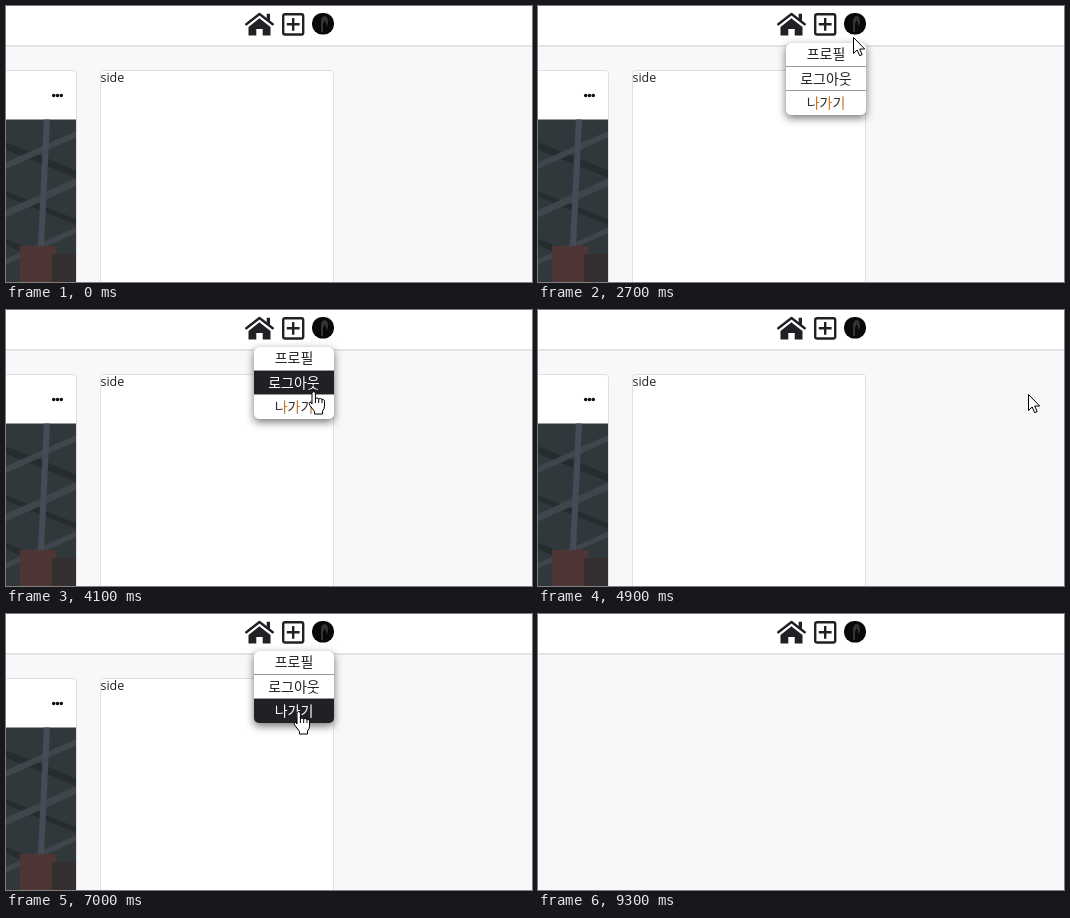
Write an HTML page that moves like this. It is 526 px wide and 276 px high and loops after 9.9 s.

```html
<!DOCTYPE html>
<html lang="ko">
<head>
<meta charset="utf-8">
<style>
  html, body { margin: 0; width: 100%; height: 100%; overflow: hidden; background: #f8f8fb; }
  svg { display: block; }
  text { font: 300 14px "Noto Sans CJK KR", "Noto Sans CJK", sans-serif; text-anchor: middle; fill: #222; }
  .latin { font: 12.5px "Open Sans", "Noto Sans", sans-serif; text-anchor: start; }
  .card { fill: #fff; stroke: #dfdfe3; }
  .ink { fill: none; stroke: #202124; stroke-width: 2.4; }
  #menu { filter: drop-shadow(0 3px 4px rgba(0, 0, 0, .55)); }
  #arrow, #hand { fill: #fff; stroke: #000; stroke-linejoin: round; }
</style>
</head>
<body>
<svg width="526" height="276" viewBox="0 0 526 276">
  <defs>
    <linearGradient id="fringe" gradientUnits="userSpaceOnUse" x1="268.700" x2="281.600" spreadMethod="repeat">
      <stop offset=".55" stop-color="#2c2a2c"/><stop offset=".65" stop-color="#c8701c"/>
    </linearGradient>
    <clipPath id="frame"><path d="M0 113.500H70V276H0z"/></clipPath>
    <clipPath id="menuShape"><rect x="248" y="37" width="80" height="72" rx="5"/></clipPath>
  </defs>

  <path fill="#fff" d="M0 0H526V39H0z"/>
  <path fill="#dedee1" d="M0 39.300H526V40.700H0z"/>
  <path fill="#202124" d="M242.500 21L253.500 12.300 264.500 21V29.500H256.700V23H250.300V29.500H242.500zM260.700 7.700H264V16L260.700 13z"/>
  <path class="ink" d="M240.300 18.300L253.500 8 266.700 18.300" stroke-linecap="round" stroke-linejoin="round"/>
  <rect class="ink" x="277.200" y="8.200" width="20" height="20.300" rx="1.800"/>
  <path class="ink" d="M287.200 12V24.700M280.800 18.300H293.600"/>
  <rect x="306" y="7" width="22" height="21.500" rx="10" fill="#080909"/>
  <path d="M315 26V14q1-4 4-4t3 6l-1 5-2-7-2 4v8z" fill="#333"/>

  <g id="page">
    <rect class="card" x="-9.500" y="64.500" width="80" height="230" rx="3"/>
    <path d="M47.700 89.500h8" stroke="#111" stroke-width="3.600" stroke-linecap="round" stroke-dasharray="0 3.800"/>
    <g clip-path="url(#frame)">
      <path fill="#31383c" d="M0 113H70V276H0z"/>
      <g id="beams"></g>
      <path stroke="#434d59" stroke-width="6" d="M41 113L35 240"/>
      <path fill="#4d3634" d="M14 240H50V276H14z"/>
      <path fill="#362f30" d="M46 248H70V276H46z"/>
    </g>
    <rect class="card" x="94.500" y="64.500" width="233" height="230" rx="3"/>
    <text class="latin" x="94.500" y="76">side</text>
  </g>

  <g id="menu">
    <g clip-path="url(#menuShape)">
      <path fill="#999" d="M248 37H328V109H248z"/>
      <g class="item"><path d="M248 37h80v23h-80z"/><text x="288" y="53">프로필</text></g>
      <g class="item"><path d="M248 61h80v23h-80z"/><text x="288" y="77.500">로그아웃</text></g>
      <g class="item"><path d="M248 85h80v24h-80z"/><text x="288" y="102" fill="url(#fringe)" style="fill:url(#fringe)">나가기</text></g>
    </g>
  </g>

  <path id="arrow" d="M.5.500V16.500L4.200 13 6.700 18.700 9.200 17.600 6.700 12H11.700z"/>
  <path id="hand" d="M-3 13V2.500q0-2 1.700-2t1.700 2V8q0-1 1.600-1t1.700 1.500q0-1 1.600-1t1.700 1.500q0-1 1.300-.6t1.200 2V15q0 3-2 5v3H-.500V20.500L-5 14.500q-1.500-2-.5-3t2.500 1.500zM.400 8v4M3.700 8.500v3.500M7 9v3"/>
</svg>
<script>
const LOOP = 9900, STEP = 100, FADE_STEPS = 3;
const $ = id => document.getElementById(id);
const items = [...document.querySelectorAll('.item')].map(g => g.children);
const baseFill = items.map(([, label]) => label.style.fill);

// Roof beams behind the pole
$('beams').innerHTML = Array.from({ length: 6 }, (_, i) =>
  `<path d="M-5 ${138 + i * 24}l80 ${i % 2 ? -36 : 32}" stroke="${i % 2 ? '#3f474c' : '#262c30'}" stroke-width="${7 - i % 3}"/>`
).join('');

const avatar = [316, 18], below = [315, 31], profile = [314, 44], logout = [309, 81],
      leave = [294, 97], rest = [490, 84], lower = [325, 115];

// Where the pointer is at each time; null means off stage
const route = [
  [0, null], [200, [300, 250]], [300, [308, 84]], [400, null],
  [1400, [402, 150]], [1900, avatar], [2400, avatar], [2700, below], [3200, leave],
  [3600, profile], [4000, logout], [4300, logout], [4400, leave], [4600, [509, 90]],
  [4700, rest], [5000, rest], [5600, avatar], [6100, avatar], [6300, [293, 80]],
  [6600, leave], [7000, leave], [7400, avatar], [7700, profile], [8400, profile],
  [8600, lower], [9000, lower], [9200, [500, 63]], [9300, null], [LOOP, null]
];
const menuOpen = t => t >= 2400 && t < 4900 || t >= 5900 && t < 8200;

function pointerAt(t) {
  const next = route.findIndex(([time]) => time > t);
  const [t0, from] = route[next - 1], [t1, to] = route[next];
  const k = (t - t0) / (t1 - t0);
  return from && from.map((v, i) => Math.round(v + ((to || from)[i] - v) * k));
}

function itemAt(t, p) {
  const inside = p && menuOpen(t) && p[0] >= 248 && p[0] < 328 && p[1] >= 37 && p[1] < 109;
  return inside ? Math.floor((p[1] - 37) / 24) : -1;
}

function hoverAt(t) {
  const shade = [0, 0, 0];
  for (let s = 0; s <= t; s += STEP) {
    const hit = itemAt(s, pointerAt(s));
    shade.forEach((v, i) => shade[i] = Math.min(FADE_STEPS, Math.max(0, v + (i === hit ? 1 : -1))));
  }
  return shade.map(v => v / FADE_STEPS);
}

const mix = (a, b, k) => `rgb(${a.map((v, i) => Math.round(v + (b[i] - v) * k))})`;
const show = (el, on) => el.style.display = on ? '' : 'none';

function draw(t) {
  const p = pointerAt(t);
  const onAvatar = p && Math.hypot(p[0] - 317, p[1] - 18) < 11;
  const hand = onAvatar || itemAt(t, p) >= 0;
  show($('page'), t < 8200);
  show($('menu'), menuOpen(t));
  show($('arrow'), p && !hand);
  show($('hand'), p && hand);
  if (p) $(hand ? 'hand' : 'arrow').setAttribute('transform', `translate(${p})`);
  hoverAt(t).forEach((k, i) => {
    const [box, label] = items[i];
    box.style.fill = mix([255, 255, 255], [32, 33, 36], k);
    label.style.fill = k ? mix([34, 34, 34], [255, 255, 255], k) : baseFill[i];
  });
}

const start = performance.now();
function tick() {
  const t = (performance.now() - start) % LOOP;
  draw(Math.floor(t / STEP) * STEP);
  requestAnimationFrame(tick);
}
tick();
</script>
</body>
</html>
```
